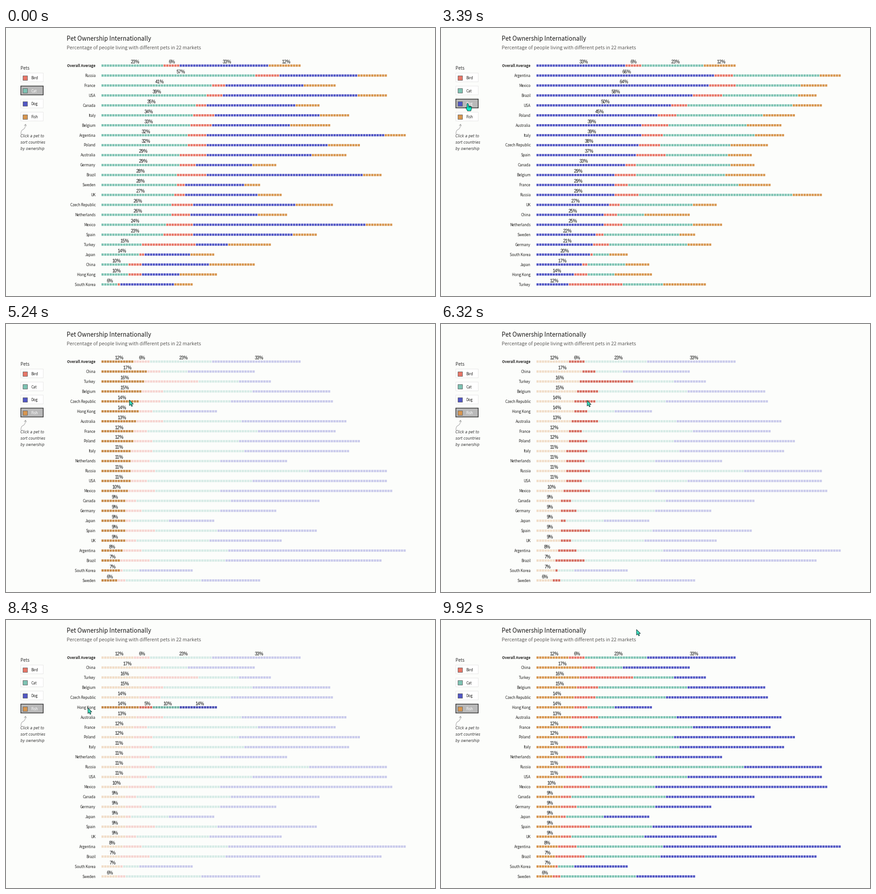
These frames come from a looping animation (948x591 px, 9990 ms). A matplotlib script:

```python
import numpy as np
import matplotlib.pyplot as plt
from matplotlib.animation import FuncAnimation
from matplotlib.collections import PolyCollection
from matplotlib.patches import PathPatch, Polygon, Rectangle
from matplotlib.path import Path
from matplotlib.transforms import Affine2D

W, H, DPI = 948, 591, 64
PT = 72 / DPI                       # points per pixel
LOOP, STEP = 9990, 45

BG = "#fcfdfb"
INK = "#06201f"
UI = "Noto Sans CJK JP"
KINDS = ["Bird", "Cat", "Dog", "Fish"]
PLAIN = np.array([[231, 118, 104], [126, 195, 179], [82, 87, 196], [215, 150, 80]]) / 255
FADED = 0.3 * PLAIN + 0.7 * 0.988
STRONG = 0.92 * PLAIN

X0, PITCH, SIDE = 211.0, 5.96, 4.9
Y0, ROW = 82.9, 21.935

# the survey: percentages in the order of KINDS, countries by name
OVERALL = ("Overall Average", 6, 23, 33, 12)
COUNTRIES = [
    ("Argentina", 7, 32, 66, 8), ("Australia", 10, 29, 39, 13),
    ("Belgium", 8, 33, 29, 15), ("Brazil", 11, 28, 58, 7),
    ("Canada", 4, 35, 33, 9), ("China", 5, 10, 25, 17),
    ("Czech Republic", 8, 26, 38, 14), ("France", 5, 41, 29, 12),
    ("Germany", 6, 29, 21, 9), ("Hong Kong", 5, 10, 14, 14),
    ("Italy", 8, 34, 39, 11), ("Japan", 2, 14, 17, 9),
    ("Mexico", 10, 24, 64, 10), ("Netherlands", 7, 26, 25, 11),
    ("Poland", 7, 32, 45, 12), ("Russia", 9, 57, 29, 11),
    ("South Korea", 1, 6, 20, 7), ("Spain", 11, 23, 37, 9),
    ("Sweden", 3, 28, 22, 6), ("Turkey", 20, 15, 12, 16),
    ("UK", 4, 27, 27, 9), ("USA", 6, 39, 50, 11),
]


def on_button(k):
    return 61.5 - 1.3 * k, 106 + 30.3 * k


# kind, time its button goes down, time the chart follows
CLICKS = [(1, 0, 0), (0, 1420, 1690), (2, 2990, 3390), (3, 4070, 4410)]
# pointer moves: start, end, destination
ENTRY = (378, 21)
MOVES = [
    (250, 950, on_button(0)), (1950, 2580, on_button(2)), (3520, 3940, on_button(3)),
    (4820, 5310, (278, 167)), (6050, 6590, (357, 170)), (7080, 7200, (291, 178)),
    (7260, 7670, (176, 173)), (8010, 8430, (181, 194)), (9220, 9920, (432, 21)),
]


# ---- behaviour -------------------------------------------------------------

def pointer_at(t):
    pos = np.array(ENTRY, float)
    for start, end, target in MOVES:
        s = np.clip((t - start) / (end - start), 0, 1)
        pos += (np.array(target) - pos) * s * s * (3 - 2 * s)
    return pos


def pressed_at(t):
    return [kind for kind, down, _ in CLICKS if down <= t][-1]


def sorted_at(t):
    return [kind for kind, _, follow in CLICKS if follow <= t][-1]


def ranking(kind):
    return [OVERALL] + sorted(COUNTRIES, key=lambda row: -row[1 + kind])


def segments(row, kind):
    """Yield kind, first square and share, the sorted kind leading."""
    start = 0
    for k in sorted(range(4), key=lambda k: k != kind):
        yield k, start, row[1 + k]
        start += row[1 + k]


def hover_at(t):
    """Row and kind under a pointer that is not rushing by; kind is None on a name."""
    x, y = pos = pointer_at(t)
    r = round((y - Y0) / ROW)
    rushing = np.hypot(*(pos - pointer_at(t - 60))) > 24
    if rushing or r < 0 or abs(y - Y0 - ROW * r) > 4:
        return None
    kind = sorted_at(t)
    row = ranking(kind)[r]
    if 150 < x < 200:
        return row, None
    for k, start, share in segments(row, kind):
        if start <= (x - X0) / PITCH < start + share:
            return row, k
    return None


# ---- fixed parts -----------------------------------------------------------

fig = plt.figure(figsize=(W / DPI, H / DPI), dpi=DPI, facecolor=BG)
ax = fig.add_axes([0, 0, 1, 1])
ax.set_xlim(0, W)
ax.set_ylim(H, 0)
ax.axis("off")


def label(x, y, s, px, color="#252423", font=UI, **kw):
    return ax.text(x, y, s, fontsize=px * PT, color=color, family=font,
                   va="baseline", **kw)


def box(x, y, w, h, z, **kw):
    return ax.add_patch(Rectangle((x, y), w, h, zorder=z, **kw))


label(134, 28.2, "Pet Ownership Internationally", 13.3, "#1b1a19")
label(134, 47, "Percentage of people living with different pets in 22 markets",
      10.63, "#605e5c")

# legend buttons
label(32, 92, "Pets", 9.8, "#333333")
buttons, captions = [], []
for i, kind in enumerate(KINDS):
    cy = 109 + 28.75 * i
    buttons.append(box(32.75, cy - 9.75, 49.5, 19.5, 1, snap=False))
    box(37.5, cy - 4.5, 10, 10, 2, facecolor=PLAIN[i], edgecolor="#666666", linewidth=PT)
    captions.append(label(55.4, cy + 4, kind, 8))

# hint with its curved arrow
for i, line in enumerate(["Click a pet to", "sort countries", "by ownership"]):
    label(32, 241 + 14.1 * i, line, 7.9, "#333333", "DejaVu Sans", style="italic")
curve = Path([(33, 234), (33, 219), (42, 229), (43.2, 213),
              (40, 215.5), (43.4, 212), (45, 216.5)],
             [Path.MOVETO] + [Path.CURVE4] * 3 + [Path.MOVETO] + [Path.LINETO] * 2)
ax.add_patch(PathPatch(curve, facecolor="none", edgecolor="#a0a0a0", linewidth=PT))

# bars, cut into unit squares by background-coloured lines
bars = ax.add_collection(PolyCollection([], linewidths=0, zorder=1, snap=False))
ax.vlines(X0 + PITCH * np.arange(1, 114) - (PITCH - SIDE) / 2, 79, 570,
          colors=BG, linewidths=(PITCH - SIDE) * PT, zorder=2, snap=False)

names, values = [], []
for r in range(len(COUNTRIES) + 1):
    y = Y0 + ROW * r
    names.append(label(198, y + 3.1, "", 8, ha="right",
                       weight="normal" if r else "bold"))
    values.append([label(0, y - 4.9, "", 9.8, "black", "Liberation Sans", zorder=3)
                   for _ in KINDS])

# tooltip, drawn around its own origin
tip_shift = Affine2D()
tip_space = tip_shift + ax.transData
tip = [box(-k, 1 - k, 133 + 2 * k, 66 + 2 * k, 5, facecolor="black", alpha=0.025,
           linewidth=0, transform=tip_space) for k in range(1, 5)]
tip.append(box(0, 0, 133, 66, 6, facecolor="white", edgecolor="#e6e6e6",
               linewidth=0.7 * PT, transform=tip_space))
tip.append(ax.add_patch(Polygon([(0.5, 5), (-3.5, 9.5), (0.5, 14)], facecolor="white",
                                linewidth=0, zorder=7, transform=tip_space)))
tip_values = []
for i, field in enumerate(["country", "Type", "Percent"]):
    base = 23.7 + 14 * i
    tip.append(label(46, base, field, 9.2, "#2f2f3a", ha="right", zorder=8,
                     transform=tip_space))
    tip_values.append(label(54.4, base, "", 9.4, "#2f2f3a", zorder=8,
                            transform=tip_space))
tip += tip_values

# pointers, drawn around their tip
shift = Affine2D()
space = shift + ax.transData


def pointer_shape(points, fill):
    return ax.add_patch(Polygon(points, facecolor=fill, edgecolor=INK,
                                linewidth=0.85 * PT, joinstyle="round", zorder=10,
                                transform=space))


arrow = [pointer_shape([(0, 0), (0, 12.2), (2.8, 9.7), (4.8, 14), (6.8, 13.1),
                        (4.9, 9), (8.7, 8.8)], "#3be0be")]
hand = [pointer_shape([(-1.6, 1), (0, -0.3), (1.6, 1), (1.8, 5.3), (8.6, 7.2),
                       (8.6, 11), (7, 16.3), (-0.3, 16.3), (-4.4, 8.5), (-1.5, 9)],
                      "#10e8c4")]
for x in (1.8, 4.2, 6.4):
    hand += ax.plot([x, x], [5.8, 8.6], color=INK, linewidth=0.85 * PT,
                    zorder=11, transform=space)


# ---- drawing ---------------------------------------------------------------

def show(artists, on):
    for artist in artists:
        artist.set_visible(on)


def fill_for(row, k, hover):
    if hover is None:
        return PLAIN[k]
    target, kind = hover
    lit = row is target if kind is None else k == kind
    return STRONG[k] if lit else FADED[k]


def draw_chart(kind, hover):
    verts, fills = [], []
    for r, row in enumerate(ranking(kind)):
        names[r].set_text(row[0])
        top, bottom = Y0 + ROW * r - 2.5, Y0 + ROW * r + 2.5
        all_values = r == 0 or (hover is not None and hover[1] is None
                                and hover[0] is row)
        for text, (k, start, share) in zip(values[r], segments(row, kind)):
            left = X0 + PITCH * start
            right = left + PITCH * share - 0.8
            verts.append([(left, top), (right, top), (right, bottom), (left, bottom)])
            fills.append(fill_for(row, k, hover))
            text.set_text(f"{share}%")
            text.set_x(X0 - 6.8 + PITCH * (start + (share + 1) // 2))
            text.set_visible(k == kind or all_values)
    bars.set_verts(verts)
    bars.set_facecolor(fills)


def draw_buttons(pressed):
    for i, (button, caption) in enumerate(zip(buttons, captions)):
        on = i == pressed
        button.set_facecolor("#b9b9b9" if on else "white")
        button.set_edgecolor("#333333" if on else "#e4e4e4")
        button.set_linewidth((1.5 if on else 0.9) * PT)
        caption.set_color("white" if on else "#252423")


def draw_tooltip(t):
    """Appears after a short rest on a bar and lingers as long."""
    hover = hover_at(t - 120)
    resting = hover is not None and hover[1] is not None and hover == hover_at(t - 240)
    show(tip, resting)
    if resting:
        row, k = hover
        x, y = pointer_at(t - 120)
        tip_shift.clear().translate(x + 9, y - 8.5)
        for text, line in zip(tip_values, (row[0], KINDS[k].lower(), f"{row[1 + k]}%")):
            text.set_text(line)


def draw_pointer(t):
    x, y = pointer_at(t)
    present = t >= MOVES[0][0]
    on_legend = x < 84 and 99 < y < 207
    show(hand, present and on_legend)
    show(arrow, present and not on_legend)
    shift.clear().translate(x, y)


def update(i):
    t = (i + 1) * STEP
    draw_chart(sorted_at(t), hover_at(t))
    draw_buttons(pressed_at(t))
    draw_tooltip(t)
    draw_pointer(t)
    return []


anim = FuncAnimation(fig, update, frames=LOOP // STEP, interval=STEP,
                     init_func=lambda: update(0), repeat=True, repeat_delay=0, blit=False)
plt.show()
```
